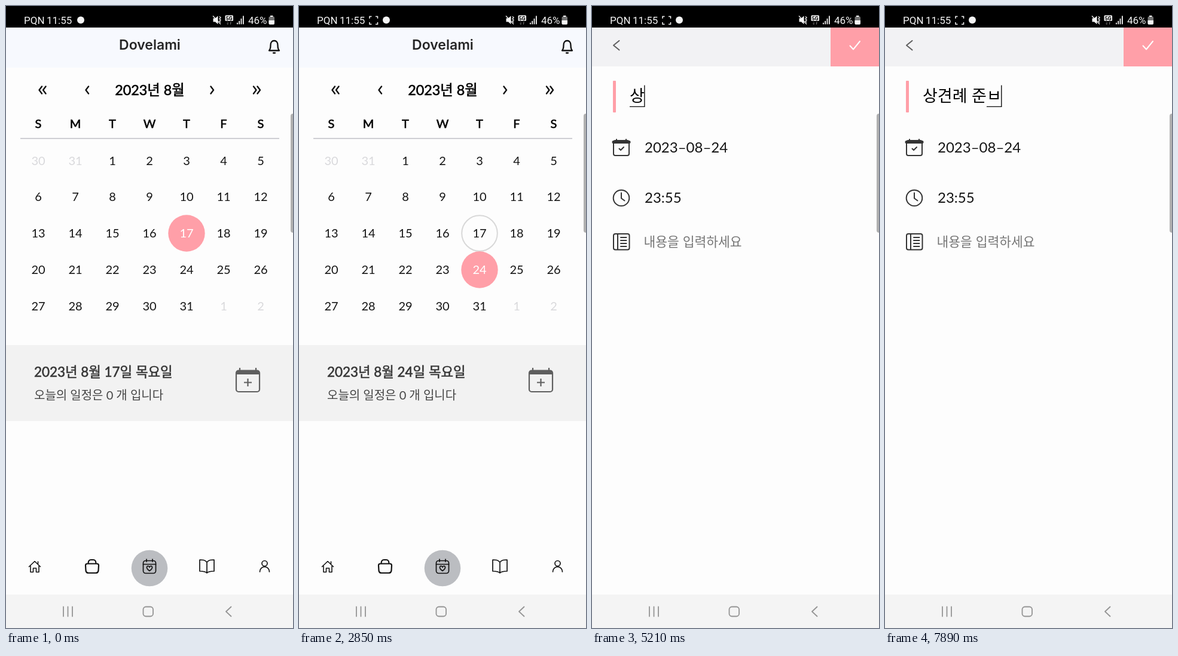
Recreate the animation shown at these times as an HTML page. Size 480 px wide and 1040 px high, loop 8000 ms.

```html
<!DOCTYPE html>
<html lang="ko">
<head>
<meta charset="utf-8">
<title>Calendar</title>
<style>
  html, body { margin: 0; width: 100%; height: 100%; overflow: hidden; background: #fdfdfd; }
  svg { display: block; width: 480px; height: 1040px; }
  text { font-family: Lato, "Noto Sans CJK KR", "Noto Sans CJK", sans-serif; white-space: pre; }
  .mid { text-anchor: middle; }
  .medium { stroke: currentColor; stroke-width: .6; fill: currentColor; }
  .line { fill: none; stroke: #111; stroke-width: 2; stroke-linecap: round; stroke-linejoin: round; }
  .form .line { stroke: #333; }
  .status text { font: 17px Roboto, sans-serif; fill: #f4f4f4; }
  .android .line { stroke: #949494; stroke-width: 1.8; }
  .day { font-size: 20px; text-anchor: middle; fill: #151515; }
  .weekday { font-size: 20px; text-anchor: middle; }
  .other { fill: #d9d9dc; }
  .picked { fill: #fff; }

  .calendar, .form, .before, .after, .slide, .capture { animation: 8s step-end infinite; }
  .calendar { animation-name: calendar; }
  .form { animation-name: form; }
  .before { animation-name: before; }
  .after { animation-name: after; }
  .slide { animation-name: slide; }
  .capture { animation-name: capture; transform-origin: 124.5px 24px; }
  @keyframes calendar { 0% { visibility: visible } 44.625%, 100% { visibility: hidden } }
  @keyframes form { 0% { visibility: hidden } 44.625%, 100% { visibility: visible } }
  @keyframes before { 0% { opacity: 1 } 27.375%, 100% { opacity: 0 } }
  @keyframes after { 0% { opacity: 0 } 27.375%, 100% { opacity: 1 } }
  @keyframes slide {
    0%, 2.125% { transform: none; animation-timing-function: ease-out }
    8%, 100% { transform: translateX(21px) }
  }
  @keyframes capture {
    0%, 4% { opacity: 0; transform: scale(.3); animation-timing-function: ease-out }
    11.625%, 100% { opacity: 1; transform: none }
  }
</style>
</head>
<body>
<svg viewBox="0 0 480 1040">
  <rect width="480" height="1040" fill="#fdfdfd"/>

  <g class="calendar">
    <rect y="36" width="480" height="67" fill="#f7f9fe"/>
    <text class="mid" x="240.5" y="73" style="font:600 23px Inter, sans-serif" fill="#262626">Dovelami</text>
    <path class="line" style="stroke-width:2.3" d="M440 74.500h17c-2-2-2.500-4-2.500-9 0-4.500-2.500-7.500-6-7.500s-6 3-6 7.500c0 5-.5 7-2.500 9zM447 78.500h3"/>

    <path class="line" style="stroke-width:2.4" d="M60 134.500l-4.500 6 4.500 6M66.500 134.500l-4.500 6 4.500 6M138 134.500l-4.500 6 4.500 6M342.500 134.500l4.500 6-4.500 6M414 134.500l4.500 6-4.500 6M420.500 134.500l4.500 6-4.500 6"/>
    <text class="mid medium" x="240.5" y="149" font-size="23.300">2023년 8월</text>
    <g id="weekdays"></g>
    <path d="M24 221.500h433" stroke="#bdbdc4" stroke-width="1.300"/>
    <g id="days"></g>
    <g class="before">
      <circle cx="302" cy="380" r="30.700" fill="#ff9fa8"/>
      <text class="day picked" x="302" y="387">17</text>
      <text class="day" x="302" y="448">24</text>
    </g>
    <g class="after">
      <circle cx="302" cy="380" r="29.800" fill="none" stroke="#d8d8d8" stroke-width="2"/>
      <text class="day" x="302" y="387">17</text>
      <circle cx="302" cy="441" r="30.700" fill="#ff9fa8"/>
      <text class="day picked" x="302" y="448">24</text>
    </g>

    <rect y="567" width="480" height="127" fill="#f2f2f2"/>
    <g font-size="22.400" color="#363636">
      <text class="before medium" x="47" y="620">2023년 8월 17일 목요일</text>
      <text class="after medium" x="47" y="620">2023년 8월 24일 목요일</text>
    </g>
    <text x="47" y="658" font-size="20" fill="#444">오늘의 일정은 0 개 입니다</text>
    <g fill="none" stroke="#5f5f5f" stroke-width="2.200">
      <rect x="385" y="609.500" width="39" height="35.500" rx="4"/>
      <path d="M385 613h39" stroke-width="6"/>
      <path d="M391 605v5M418 605v5M404.500 623v13M398 629.500h13"/>
    </g>

    <circle cx="240" cy="940" r="30.300" fill="#bbbdc1"/>
    <path class="line" style="stroke-width:1.600" d="M38.500 937.500l9.500-9 9.500 9M41 936v10.500h4.500v-6.500h5v6.500h4.500v-10.500M53.500 929v4"/>
    <path class="line" style="stroke-width:2.2" d="M136 932.500h16q3 0 3 3l-.5 8.500q-.5 4-4.500 4h-12q-4 0-4.500-4l-.5-8.500q0-3 3-3zM137.500 932.500q0-6.500 4.500-6.500h4q4.500 0 4.500 6.500"/>
    <g class="line" style="stroke-width:1.700">
      <rect x="229.500" y="927.500" width="21" height="21" rx="4"/>
      <path d="M229.500 933.500h21M235 925v4M245 925v4M240 944.500c-7-5-4.500-8.500-2-8 1 .2 2 1 2 2 0-1 1-1.800 2-2 2.500-.5 5 3 -2 8z"/>
      <path d="M336 930c-3-4-7-4-12-4v19c5 0 9 0 12 3 3-3 7-3 12-3v-19c-5 0-9 0-12 4zv18"/>
      <circle cx="432.500" cy="932" r="4.500"/>
      <path d="M424.500 946c0-11 16-11 16 0"/>
    </g>
  </g>

  <g class="form">
    <rect y="36" width="480" height="65" fill="#f2f2f4"/>
    <path class="line" style="stroke:#5f5f5f" d="M45.500 58l-9.500 7.800 9.500 7.800"/>
    <rect x="399" y="36" width="81" height="65" fill="#ff9fa8"/>
    <path class="line" style="stroke:#fff" d="M431.500 66.500l5.500 6 11-13.500"/>
    <rect x="35" y="125" width="5" height="53" rx="1" fill="#ff9fa8"/>

    <text id="entry" x="63" y="160" font-size="27" style="font-family:'Noto Sans CJK KR','Noto Sans CJK',sans-serif"></text>
    <path id="composing" stroke="#111" stroke-width="1.300"/>
    <path id="caret" stroke="#111" stroke-width="1.400"/>

    <g class="line">
      <rect x="36" y="225" width="26" height="25" rx="3"/>
      <path d="M36 227.500h26" stroke-width="5"/>
      <path d="M41 223v3M57 223v3M45.500 238.500l2.500 2.500 5-5"/>
      <circle cx="49" cy="321" r="13.300"/>
      <path d="M49 312.500v9l5.500 4"/>
      <rect x="36" y="381" width="26.500" height="26.500" rx="3"/>
      <path d="M43 381v26M48 387h9.500M48 392h9.500M48 397h9.500M48 402h9.500"/>
    </g>
    <g font-size="24" fill="#151515">
      <text x="88" y="245">2023–08–24</text>
      <text x="88" y="329">23:55</text>
    </g>
    <text x="86.500" y="402" font-size="21.500" font-weight="300" fill="#757575">내용을 입력하세요</text>
  </g>

  <path d="M480 180q-4 0-4 4v191q0 4 4 4z" fill="#b0b0b0"/>

  <g class="android">
    <rect y="984" width="480" height="56" fill="#f4f4f4"/>
    <path class="line" d="M96 1004.500v16M103.500 1004.500v16M111 1004.500v16M376.500 1004.500l-8.500 8 8.500 8"/>
    <rect class="line" x="229.500" y="1004.500" width="16.500" height="16" rx="4.500"/>
  </g>

  <g class="status">
    <rect width="480" height="36"/>
    <text x="30" y="29.500">PQN</text>
    <text x="68" y="29.500">11:55</text>
    <path class="capture" d="M118 21v-3.500h3.500M128 17.500h3.500v3.500M131.500 27v3.500h-3.500M121.500 30.500h-3.500v-3.500" fill="none" stroke="#f4f4f4" stroke-width="1.500"/>
    <circle class="slide" cx="125" cy="23.500" r="6" fill="#f4f4f4"/>
    <g fill="#f4f4f4">
      <path d="M346.500 20.500h3.500l4.500-4v14l-4.500-4h-3.500z"/>
      <rect x="366.500" y="15.500" width="13.500" height="9.500" rx="1.500"/>
      <path d="M386 28h1.800v2.500h-1.800zM389.300 25h1.800v5.500h-1.800zM392.600 21h1.800v9.500h-1.800zM396 16.500h1.800v14h-1.800z"/>
      <rect x="439.500" y="17.500" width="9.500" height="13.500" rx="2" fill="#757575"/>
      <path d="M442 16h4.500v2h-4.500zM439.500 24h9.500v5q0 2-2 2h-5.500q-2 0-2-2z"/>
    </g>
    <path d="M346 16.500l13 14M357 17.500l2 2-2 2 2 2-2 2 2 2" fill="none" stroke="#f4f4f4" stroke-width="1.300"/>
    <path d="M371 27v4M369.500 29.500l1.500 1.500M375.500 31v-4l1.500 1.500" fill="none" stroke="#757575"/>
    <text class="mid" x="373.200" y="23.500" style="font-size:8.500px;font-weight:700;fill:#000">5G</text>
    <text x="405" y="29.500">46%</text>
  </g>
</svg>
<script>
  const $ = id => document.getElementById(id);
  const cell = (label, col, y, cls) =>
    `<text class="${cls}" x="${54 + col * 62}" y="${y}">${label}</text>`;

  $('weekdays').innerHTML = [...'SMTWTFS'].map((d, i) => cell(d, i, 203.5, 'weekday medium')).join('');

  // The grid opens two days before the 1st; 17 and 24 are drawn with their own states.
  let grid = '';
  for (let i = 0; i < 35; i++) {
    const n = i - 1;
    if (n === 17 || n === 24) continue;
    const label = n < 1 ? n + 31 : n > 31 ? n - 31 : n;
    grid += cell(label, i % 7, 265.5 + Math.floor(i / 7) * 60.8, n < 1 || n > 31 ? 'day other' : 'day');
  }
  $('days').innerHTML = grid;

  const typing = [
    [0, ''], [4420, 'ㅅ'], [4920, '사'], [5100, '상'], [5260, '상ㄱ'], [5450, '상겨'],
    [5650, '상견'], [5920, '상견ㄹ'], [6250, '상견례'], [6640, '상견례 '], [6920, '상견례 ㅈ'],
    [7150, '상견례 주'], [7400, '상견례 준'], [7640, '상견례 준ㅂ'], [7890, '상견례 준비']
  ];
  const entry = $('entry'), left = 63;
  const clock = document.querySelector('.form').getAnimations()[0];
  let shown = null;

  function widthOf(text) {
    entry.textContent = text;
    return text ? entry.getComputedTextLength() : 0;
  }

  function draw() {
    const t = (clock.currentTime || 0) % 8000;
    const text = typing.filter(([at]) => at <= t).pop()[1];
    const focused = t >= 3940;
    const key = text + focused;
    if (key !== shown) {
      shown = key;
      const start = left + widthOf(text.slice(0, -1));
      const end = left + widthOf(text);
      $('composing').setAttribute('d', text && !text.endsWith(' ') ? `M${start} 168.300H${end}` : '');
      $('caret').setAttribute('d', focused ? `M${end} 132.500V169` : '');
    }
    requestAnimationFrame(draw);
  }
  draw();
</script>
</body>
</html>
```
